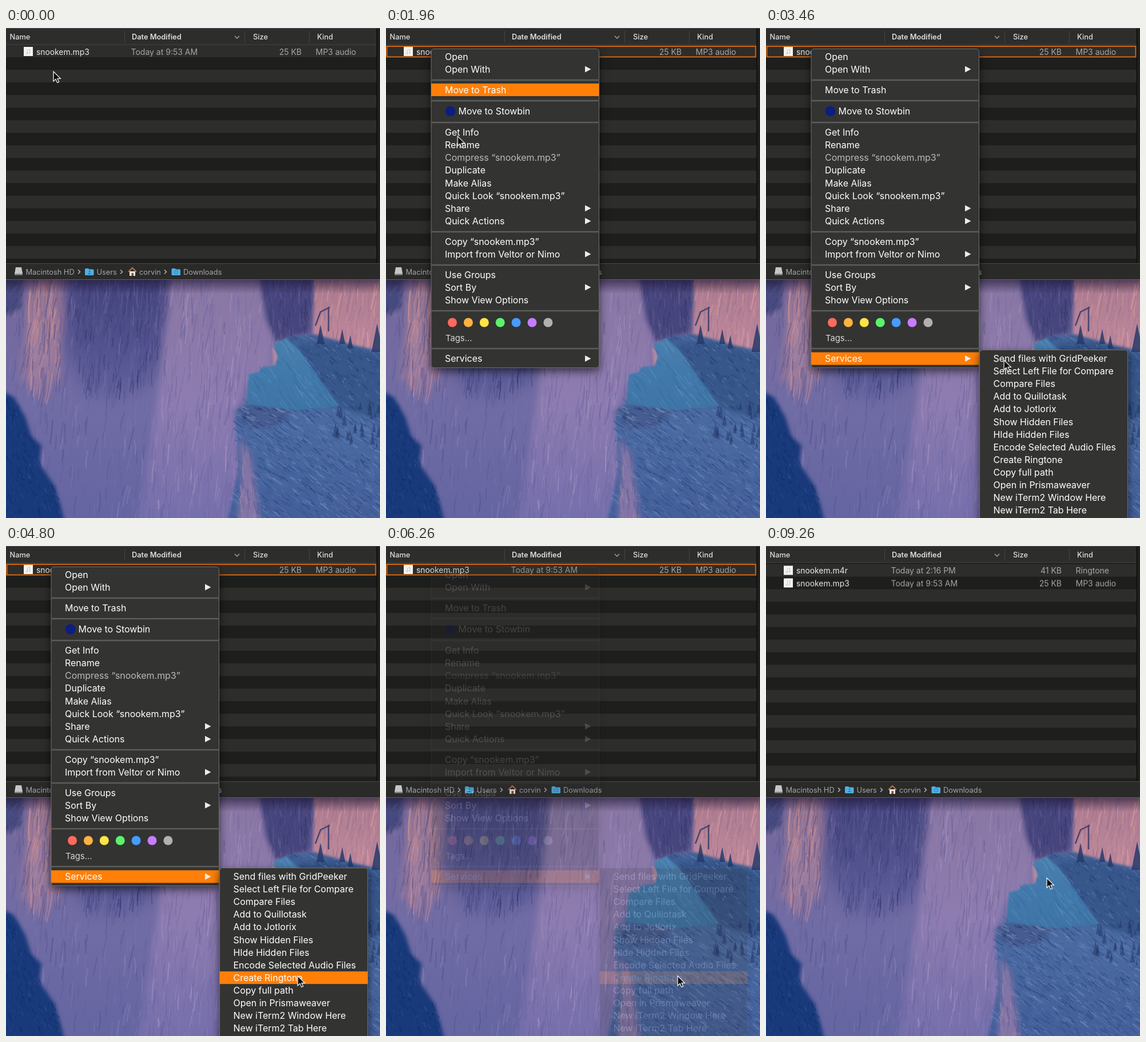
An HTML page with a canvas that plays this animation: 654 px wide and 856 px high, repeating every 9.3 s.

```html
<!DOCTYPE html>
<html lang="en">
<head>
<meta charset="utf-8">
<title>Create a ringtone from the Services menu</title>
<style>
  html, body { margin: 0; width: 100%; height: 100%; overflow: hidden; background: #1e1e1c; }
  canvas, svg { position: absolute; left: 0; top: 0; display: block; }
  canvas { top: 440px; }
  text { font: 14px Inter, "Open Sans", sans-serif; fill: #a6a6a8; }
  .file { font-size: 13.85px; fill: #ececec; }
  .end { text-anchor: end; }
  .head text { font-size: 12.8px; font-weight: 500; fill: #dedede; }
  .head .sorted { font-weight: 600; }
  .path text { font-size: 12.8px; fill: #a6a5aa; }
  .menu { filter: drop-shadow(0 6px 8px #0009); opacity: 0; }
  .menu text { font-size: 15.95px; fill: #fff; }
  .menu .dim { fill: #bababa; }
  .menu .tags { font-size: 14.8px; fill: #d6d6d6; }
  .panel { fill: #333332; stroke: #70706f; }
  .bar { fill: #ff7f08; opacity: 0; }
</style>
</head>
<body>
<canvas id="wall" width="654" height="416"></canvas>
<svg width="654" height="856" viewBox="0 0 654 856">
  <defs>
    <pattern id="stripes" y="29" width="654" height="44" patternUnits="userSpaceOnUse">
      <rect width="654" height="44" fill="#1e1e1c"/>
      <rect width="654" height="22" fill="#2d2d2c"/>
    </pattern>
    <clipPath id="listArea"><rect y="29" width="648" height="382"/></clipPath>
    <linearGradient id="shade" x2="0" y2="1">
      <stop stop-color="#1a1230" stop-opacity=".6"/>
      <stop offset="1" stop-color="#1a1230" stop-opacity="0"/>
    </linearGradient>
    <g id="icon">
      <rect x="31" y="33" width="16" height="16" fill="#f3f3f1"/>
      <path d="M37.500 44.500V38.500L42 37.500V43.500" fill="none" stroke="#c9c9cb"/>
      <circle cx="36.500" cy="44.500" r="1.300" fill="#c9c9cb"/>
      <circle cx="41" cy="43.500" r="1.300" fill="#c9c9cb"/>
    </g>
    <path id="folder" d="M0 1.500Q0 0 1.500 0H6L7.500 1.500H14Q15.500 1.500 15.500 3V10.500Q15.500 12 14 12H1.500Q0 12 0 10.500Z" fill="#4fb0e3"/>
    <path id="chevron" d="M0 -3.500L3.500 0 0 3.500" fill="none" stroke="#b5b5b5" stroke-width="1.500"/>
  </defs>

  <rect y="440" width="654" height="24" fill="url(#shade)"/>
  <rect width="654" height="440" fill="#20201f"/>
  <g clip-path="url(#listArea)">
    <rect id="rows" y="-15" width="648" height="440" fill="url(#stripes)"/>
    <rect id="tint" y="29" width="648" height="382" fill="#262630" opacity="0"/>
    <g id="made" opacity="0">
      <use href="#icon" y="1.500"/>
      <text class="file" x="53" y="47.500">snookem.m4r</text>
      <text x="218.500" y="47.500">Today at 2:16 PM</text>
      <text class="end" x="517" y="47.500">41 KB</text>
      <text id="kind" x="541.500" y="47.500">Ringtone</text>
    </g>
    <g id="mp3">
      <use href="#icon"/>
      <text class="file" x="53" y="46.500">snookem.mp3</text>
      <text x="218.500" y="46.500">Today at 9:53 AM</text>
      <text class="end" x="517" y="46.500">25 KB</text>
      <text x="541.500" y="46.500">MP3 audio</text>
    </g>
    <rect id="outline" x="1.500" y="32" width="645" height="18.500" fill="none" stroke="#d4660f" stroke-width="2" opacity="0"/>
  </g>

  <g class="head">
    <rect width="648" height="29" fill="#2d2d2c"/>
    <path d="M0 .5H654" stroke="#4d4d55"/>
    <path d="M0 29H648M207.500 5V26M417.500 5V26M530.500 5V26" stroke="#444443"/>
    <text x="6.500" y="20">Name</text>
    <text class="sorted" x="220" y="20">Date Modified</text>
    <text x="432" y="20">Size</text>
    <text x="544" y="20">Kind</text>
    <path d="M400 14L404 18 408 14" fill="none" stroke="#a5a5a5" stroke-width="1.400"/>
  </g>
  <path d="M648.500 1V411" stroke="#0d0d0d" stroke-width="1.500"/>

  <g class="path">
    <rect y="411" width="654" height="29" fill="#2a2a29"/>
    <path d="M0 411.500H654" stroke="#4a4a49"/>
    <path d="M0 439.500H654" stroke="#626069"/>
    <path d="M17 418H27L29 429V432H15V429Z" fill="#c6c6c8"/>
    <path d="M15 429.500H29V432H15Z" fill="#77777a"/>
    <text x="34.500" y="430.500">Macintosh HD</text>
    <use href="#chevron" x="126" y="426"/>
    <use href="#folder" x="138" y="420"/>
    <circle cx="146" cy="425" r="1.500" fill="#2b79b4"/>
    <path d="M143 430Q146 425 149 430Z" fill="#2b79b4"/>
    <text x="158.500" y="430.500">Users</text>
    <use href="#chevron" x="200" y="426"/>
    <path d="M216 425H226V433H216Z" fill="#eee6da"/>
    <path d="M214 426L221 419 228 426" fill="none" stroke="#b5734c" stroke-width="2"/>
    <path d="M219.500 428H223V433H219.500Z" fill="#8a4a35"/>
    <text x="233" y="430.500">corvin</text>
    <use href="#chevron" x="277" y="426"/>
    <use href="#folder" x="289.500" y="420"/>
    <circle cx="297.500" cy="426.500" r="3" fill="none" stroke="#2b79b4"/>
    <text x="310" y="430.500">Downloads</text>
  </g>

  <g id="menu" class="menu">
    <rect class="panel" x="79" y="36.500" width="293.500" height="557" rx="5"/>
    <rect class="bar" x="79" y="-11" width="293.500" height="22"/>
    <path d="M79 91H373M79 127H373M79 165H373M79 356H373M79 414H373M79 494H373M79 560H373" stroke="#5c5c5b" stroke-width="2.400"/>
    <circle cx="112.500" cy="145.500" r="9" fill="#0c1f80"/>
    <text class="tags" x="104" y="546.500">Tags...</text>
  </g>
  <g id="submenu" class="menu">
    <rect class="panel" x="373.500" y="562.500" width="259" height="310" rx="5"/>
    <rect class="bar" x="373.500" y="-11" width="259" height="22"/>
  </g>
  <path id="cursor" d="M0 0V17L4 13.300 6.700 19.500 9.600 18.300 7 12.300H12.300Z" fill="#0a0a0a" stroke="#f2f2f2" stroke-width="1.300"/>
</svg>

<script>
const LOOP = 9300, LAG = 80;
const $ = id => document.getElementById(id);

function add(parent, tag, attrs, label = '') {
  const el = document.createElementNS('http://www.w3.org/2000/svg', tag);
  for (const name in attrs) el.setAttribute(name, attrs[name]);
  el.textContent = label;
  parent.append(el);
}

// frames: [ms, style, easing]; the first and last poses are held to the loop's ends
function play(el, frames, easing = 'step-end') {
  const held = [[0, frames[0][1]], ...frames, [LOOP, frames.at(-1)[1]]];
  el.animate(
    held.map(([ms, style, ease = easing]) => ({ ...style, offset: ms / LOOP, easing: ease })),
    { duration: LOOP, iterations: Infinity });
}
const fade = (el, frames, easing) =>
  play(el, frames.map(([ms, opacity, ease]) => [ms, { opacity }, ease]), easing);
const at = (x, y) => ({ transform: `translate(${x}px, ${y}px)` });

// Menus
const sections = [
  [50, 'Open', 'Open With>'],
  [108, 'Move to Trash'],
  [145.5, 'Move to Stowbin'],
  [182.5, 'Get Info', 'Rename', 'Compress “snookem.mp3”', 'Duplicate', 'Make Alias',
    'Quick Look “snookem.mp3”', 'Share>', 'Quick Actions>'],
  [373, 'Copy “snookem.mp3”', 'Import from Veltor or Nimo>'],
  [431, 'Use Groups', 'Sort By>', 'Show View Options'],
  [577.5, 'Services>']
];
const services = ['Send files with GridPeeker', 'Select Left File for Compare', 'Compare Files',
  'Add to Quillotask', 'Add to Jotlorix', 'Show Hidden Files', 'HIde Hidden Files',
  'Encode Selected Audio Files', 'Create Ringtone', 'Copy full path', 'Open in Prismaweaver',
  'New iTerm2 Window Here', 'New iTerm2 Tab Here'];

const menuRows = [];
for (const [top, ...labels] of sections) labels.forEach((label, i) => {
  const y = top + i * 22.1, dim = label.startsWith('Compress');
  add($('menu'), 'text', { x: label.endsWith('Stowbin') ? 126.5 : 103, y: y + 5.6, class: dim ? 'dim' : '' },
    label.replace('>', ''));
  if (label.endsWith('>'))
    add($('menu'), 'path', { d: `M348 ${y - 5.5}L358.500 ${y}L348 ${y + 5.5}Z`, fill: '#ececec' });
  if (!dim) menuRows.push(y);
});
const subRows = services.map((label, i) => {
  const y = 577.5 + i * 22.08;
  add($('submenu'), 'text', { x: 397.5, y: y + 5.6 }, label);
  return y;
});
['#ff6a60', '#ffb240', '#ffe445', '#5cf26c', '#469dff', '#c87cff', '#b1b1b1'].forEach((fill, i) =>
  add($('menu'), 'circle', { cx: 116 + i * 27.9, cy: 514.5, r: 8, fill }));

// Pointer: the menu highlight follows its height, a moment later
const toServices = [[1760, 75.5, 37], [1880, 103, 105], [1960, 125, 188], [2200, 178, 400],
  [2420, 212, 530], [2660, 224, 572]];
const downSubmenu = [[3460, 416, 580], [3760, 446, 596], [4060, 472, 628], [4350, 494, 700],
  [4600, 507, 740], [4800, 510, 751]];
const moves = [[30, 83, 76, 'ease-in-out'], [630, 75.5, 37], ...toServices, [3130, 224, 572],
  ...downSubmenu, [9000, 510, 751, 'ease-in-out'], [9260, 491, 580]];
play($('cursor'), moves.map(([ms, x, y, ease]) => [ms, at(x, y), ease]), 'linear');

function timeAt(path, y) {
  if (y <= path[0][2]) return path[0][0];
  const i = path.findIndex(point => point[2] >= y);
  if (i < 0) return Infinity;
  const [t0, , y0] = path[i - 1], [t1, , y1] = path[i];
  return t0 + (t1 - t0) * (y - y0) / (y1 - y0);
}
function highlight(menu, rows, path) {
  const frames = [[0, { opacity: 0, ...at(0, rows[0]) }]];
  for (const y of rows) {
    frames.push([timeAt(path, y - 11) + LAG, { opacity: 1, ...at(0, y) }]);
    frames.push([timeAt(path, y + 11) + LAG, { opacity: 0, ...at(0, y) }]);
  }
  play(menu.querySelector('.bar'), frames.filter(f => f[0] < LOOP).sort((a, b) => a[0] - b[0]));
}
highlight($('menu'), menuRows, toServices);
highlight($('submenu'), subRows, downSubmenu);

fade($('outline'), [[0, 0], [800, 1], [6300, 0]]);
fade($('menu'), [[0, 0], [930, 1], [5930, 1, 'ease-in'], [6300, 0]]);
fade($('submenu'), [[0, 0], [2660, .85], [2700, .95], [2800, 1], [5930, 1, 'ease-in'], [6300, 0]]);

// The new file pushes the old one down
fade($('made'), [[7860, 0], [8060, 1]], 'ease-in-out');
fade($('kind'), [[0, 0], [8360, 1]]);
fade($('tint'), [[0, 0], [7830, .28, 'linear'], [8060, 0]]);
play($('mp3'), [[7850, at(0, 0)], [8060, at(0, 23.5)]], 'ease-in-out');
play($('rows'), [[0, at(0, 0)], [7830, at(0, 4), 'linear'], [8060, at(0, 2.5)]]);

// Wallpaper: cliff, slab and wooded hill
const ctx = $('wall').getContext('2d');
ctx.translate(0, -440);
let seed = 11;
const rnd = (a = 0, b = 1) => {
  seed = (seed * 16807) % 2147483647;
  return a + (b - a) * seed / 2147483647;
};
function ramp(y0, y1, ...colors) {
  const g = ctx.createLinearGradient(0, y0, 0, y1);
  colors.forEach((c, i) => g.addColorStop(i / (colors.length - 1), c));
  return g;
}

// Fills a soft-edged shape and grains it with n strokes leaning by `lean` per unit of height
function region(points, soft, fill, n, colors, lean, length) {
  const shape = new Path2D(`M${points}Z`);
  const numbers = points.split(/[ ,]/).map(Number);
  const xs = numbers.filter((_, i) => i % 2 === 0), ys = numbers.filter((_, i) => i % 2);
  ctx.filter = soft ? `blur(${soft}px)` : 'none';
  ctx.fillStyle = fill;
  ctx.fill(shape);
  ctx.filter = 'none';
  for (let i = 0; i < n; i++) {
    const x = rnd(Math.min(...xs), Math.max(...xs)), y = rnd(Math.min(...ys), Math.max(...ys));
    const h = length * rnd(.3, 1), dx = h * (lean + rnd(-.15, .15));
    if (!ctx.isPointInPath(shape, x, y - 440)) continue;
    ctx.strokeStyle = colors[i % colors.length];
    ctx.globalAlpha = rnd(.15, .6);
    ctx.lineWidth = rnd(.5, 2.4);
    ctx.beginPath();
    ctx.moveTo(x - dx / 2, y - h / 2);
    ctx.lineTo(x + rnd(-2, 2), y + rnd(-2, 2));
    ctx.lineTo(x + dx / 2, y + h / 2);
    ctx.stroke();
  }
  ctx.globalAlpha = 1;
}

region('-30,410 690,410 690,890 -30,890', 0, ramp(440, 856, '#76689a', '#716ca4', '#6465a2'), 900,
  ['#4a4c8c', '#9485b6', '#56589a', '#7f78b0'], -.1, 45);
region('-20,420 32,420 26,490 -20,510', 4, '#474a7e', 60, ['#30366a', '#77709c'], -.6, 20);
region('42,420 106,420 100,530 92,610 62,650 24,610 38,520', 7, ramp(440, 650, '#94748f', '#a27f9c', '#8674a2'), 260,
  ['#de9890', '#534f88', '#c98d98', '#6a5f92'], -.1, 60);
region('108,420 288,420 276,560 256,620 200,650 140,640 104,560', 14, ramp(440, 650, '#44437c', '#50508c', '#6463a0'), 620,
  ['#33376f', '#746fa4', '#3d427c', '#5d5c96'], -.1, 40);
region('292,420 440,420 466,545 468,600 420,625 400,680 406,770 395,870 230,870 266,640', 6,
  ramp(440, 856, '#8976a2', '#8e7cb0', '#756fac'), 850, ['#635f9c', '#ab98c2', '#7669a2', '#8a80b6'], -.1, 50);
region('440,420 540,420 532,532 490,542 474,548 456,510', 4, '#47457e', 160, ['#303566', '#6c648f'], .05, 30);
region('540,420 670,420 670,570 610,557 537,537', 2, ramp(440, 568, '#a8798d', '#c48c9e'), 240,
  ['#e0a2a2', '#8a698f', '#b57f98'], -.15, 45);
region('490,540 540,535 610,555 670,568 670,870 385,870 408,770 400,680 415,660 475,640', 2,
  ramp(540, 856, '#406196', '#4a6aa2', '#445f9a'), 1900, ['#253f74', '#6a92bd', '#2e4a82', '#7481b2'], 1.3, 12);
region('505,552 560,548 670,574 670,690 585,665', 5, '#37568a', 420, ['#1f3868', '#6489b2', '#29457a'], 1, 9);
region('410,715 428,745 446,870 404,870 412,790', 5, '#8475a6', 90, ['#a98bad', '#575a96'], .1, 28);
region('398,670 430,655 505,668 470,698 420,698', 3, '#475d92', 120, ['#233a6e', '#7e95bd'], 2, 8);
region('466,560 476,545 480,590 468,592', 2, '#b58aa2', 0, [], 0, 0);
region('425,605 442,601 448,592 470,590 475,575 468,552 490,542 512,562 545,608 582,660 510,668 420,657', 1,
  ramp(542, 668, '#4a80ae', '#4279ab', '#3f74a6'), 160, ['#346a9e', '#5a93be'], .75, 24);
region('-20,628 14,645 34,680 44,712 62,730 58,760 85,800 105,870 -20,870', 3, '#18397a', 520,
  ['#0d265e', '#2f5799', '#12306f'], .4, 10);

function tree(x, y, h) {
  ctx.beginPath();
  ctx.moveTo(x, y - h);
  ctx.lineTo(x + h / 5, y);
  ctx.lineTo(x - h / 5, y);
  ctx.fill();
}
ctx.fillStyle = '#27396a';
ctx.globalAlpha = .85;
tree(550, 552, 34);
tree(588, 552, 26);
tree(602, 560, 24);
tree(649, 566, 50);
ctx.globalAlpha = .55;
for (let i = 0; i < 24; i++) tree(rnd(575, 654), rnd(660, 735), rnd(10, 26));
ctx.globalAlpha = 1;
ctx.strokeStyle = '#4a4470';
ctx.lineWidth = 2.5;
ctx.stroke(new Path2D('M541 520L550 496 566 488M564 487V530'));
</script>
</body>
</html>
```
